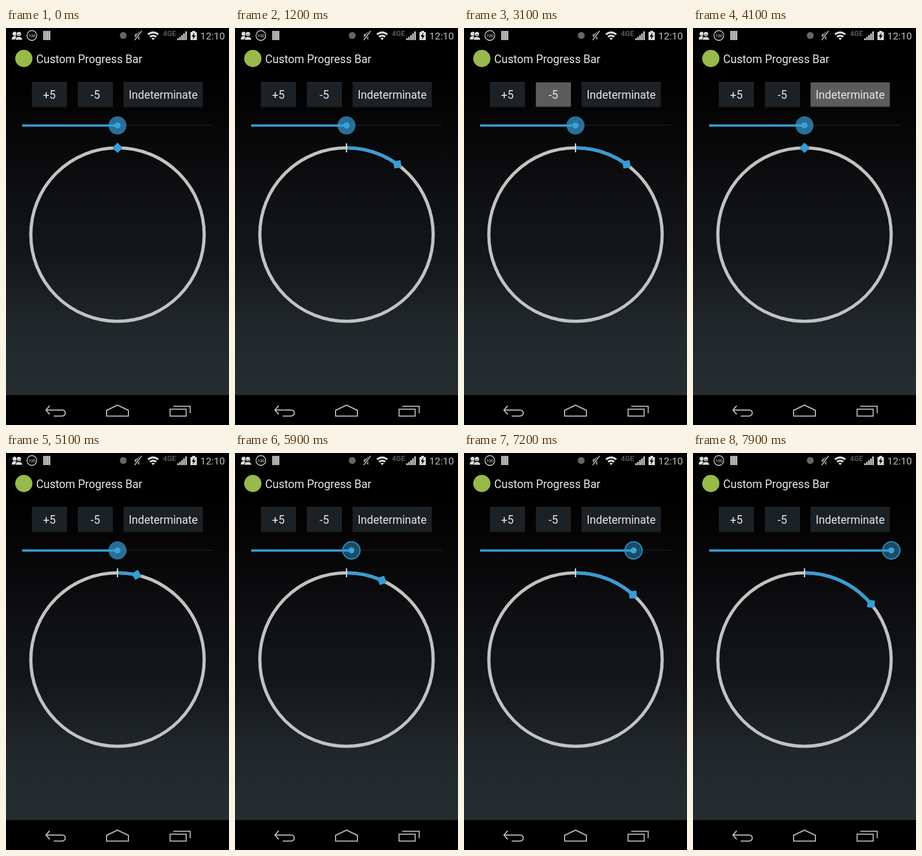
Animation of 388x690 px, one loop 8 s. Source, as an HTML page:

```html
<!DOCTYPE html>
<html lang="en">
<head>
<meta charset="utf-8">
<title>Custom Progress Bar</title>
<style>
html, body { margin: 0; width: 100%; height: 100%; overflow: hidden; background: #000; }
svg { display: block; width: 100vw; height: 100vh; }
text { font-family: Roboto, sans-serif; fill: #e6e6e6; }
.line { fill: none; stroke: #b2b2b2; stroke-width: 2; }
</style>
</head>
<body>
<svg viewBox="0 0 388 690">
  <defs>
    <linearGradient id="backdrop" x1="0" y1="0" x2="0" y2="1">
      <stop offset="0" stop-color="#000"/>
      <stop offset=".14" stop-color="#010101"/>
      <stop offset=".35" stop-color="#0a0a0c"/>
      <stop offset=".48" stop-color="#101114"/>
      <stop offset=".62" stop-color="#141619"/>
      <stop offset=".72" stop-color="#1b1f22"/>
      <stop offset=".83" stop-color="#21282b"/>
      <stop offset="1" stop-color="#262d31"/>
    </linearGradient>
  </defs>
  <rect width="388" height="690"/>
  <rect width="388" height="638" fill="url(#backdrop)"/>

  <!-- status bar -->
  <g fill="#dcdcdc">
    <circle cx="15" cy="10" r="3.6"/>
    <path d="M10 20q0-6 5-6q4 0 5 6z"/>
    <circle cx="22.500" cy="10.500" r="4.300" stroke="#000"/>
    <path d="M16 21q1-6 6.500-6t6.500 6z" stroke="#000"/>
    <path d="M20.500 11.500q2 2 4 0" fill="none" stroke="#000"/>
    <circle cx="45" cy="13" r="8.500" fill="none" stroke="#dcdcdc" stroke-width="1.300"/>
    <path d="M65 5h2.500v16H65zM68.300 5h2.500v16h-2.500zM71.500 5h2.500v16h-2.500zM74.700 5H77v16h-2.300z"/>
    <circle cx="204" cy="13" r="6" fill="#666"/>
    <path d="M224 10.500h3l5-4.500v15l-5-5h-3z" fill="#999"/>
    <path d="M236 5L224 21" fill="none" stroke="#000" stroke-width="4"/>
    <path d="M236 5L224 21" fill="none" stroke="#c8c8c8" stroke-width="1.500"/>
    <path d="M246 10q10-8 20 0l-2 2.500q-8-6-16 0zM249.500 14q6.500-4.500 13 0l-2 2.500q-4.500-3-9 0zM253 18q3-2 6 0l-3 3z"/>
    <path d="M298 18h2.500v3H298zM301.500 15.500h2.500V21h-2.500zM305 12.500h2.500V21H305zM308.500 9.500h2.500V21h-2.500zM312 6h2.500v15H312z"/>
    <path d="M324 5h5v2h3v14h-11V7h3z"/>
    <path d="M328 8l-5 7h3l-1 5 5-7h-3z" fill="#000"/>
  </g>
  <text x="45" y="15.700" font-size="7.500" text-anchor="middle">100</text>
  <text x="273" y="14" font-size="12.500" font-weight="700" style="fill:#565656">4GE</text>
  <text x="338" y="20" font-size="17.250" style="fill:#bdbdbd">12:10</text>

  <!-- action bar -->
  <circle cx="31" cy="53" r="15" fill="#98b94b"/>
  <text x="52.500" y="60.500" font-size="19.500">Custom Progress Bar</text>

  <g id="buttons"></g>

  <!-- slider -->
  <path d="M194 169H360" stroke="#1d1d1d" stroke-width="1.500"/>
  <path id="level" stroke="#359ed6" stroke-width="4"/>
  <g id="thumb">
    <circle id="halo" fill="#369dd5"/>
    <circle r="5.300" fill="#3aa3dc"/>
  </g>

  <!-- circular progress -->
  <circle cx="194" cy="359" r="150.800" fill="none" stroke="#c1c2c2" stroke-width="5.600"/>
  <path id="arc" fill="none" stroke="#369dd5" stroke-width="5.600"/>
  <path d="M194 200.500V216" stroke="#dadada" stroke-width="2.200"/>
  <rect id="marker" x="-6.400" y="-6.400" width="12.800" height="12.800" fill="#369dd5"/>

  <!-- navigation bar -->
  <g class="line">
    <path d="M76 656.500L69.500 664L76 671.500M70 664H97.500Q103 664 103 669T97.500 674.500H83"/>
    <path d="M175 674.500V664.500L194 655.500L213 664.500V674.500Z" stroke-linejoin="round"/>
    <path d="M285.500 662.500H313.500V674.500H285.500ZM291 657.500H320.500V669.500"/>
  </g>
</svg>
<script>
const LOOP = 8000, CENTER_X = 194, CENTER_Y = 359, RADIUS = 150.8;
const byId = id => document.getElementById(id);

// Each press lasts from its first to its second time; the click lands on release.
const buttons = [
  { label: '+5', x: 45, width: 61, step: 18, presses: [[500, 700], [1000, 1200], [1500, 1700]] },
  { label: '-5', x: 125, width: 61, step: -18, presses: [[2500, 2700], [3000, 3200], [3500, 3700]] },
  { label: 'Indeterminate', x: 204.5, width: 138, step: 0, presses: [[4000, 4200]] }
];
const spin = [[4200, 0], [5100, 12.7], [6600, 34.2], [7900, 50.1], [8000, 51.3]];
const drag = [[5780, 194], [6600, 252], [7900, 345], [8000, 352]];
const GRAB_TIME = 5600;

for (const button of buttons) {
  const { x, width, label } = button;
  byId('buttons').insertAdjacentHTML('beforeend', `<g>
    <rect x="${x}" y="94" width="${width}" height="43.5" rx="1"/>
    <path d="M${x} 94.500h${width}" stroke="#2b3134"/>
    <path d="M${x} 137h${width}" stroke="#14181a"/>
    <text x="${x + width / 2}" y="123" font-size="19.400" text-anchor="middle">${label}</text></g>`);
  button.face = byId('buttons').lastElementChild.querySelector('rect');
}

function along(points, t) {
  if (t <= points[0][0]) return points[0][1];
  for (let i = 1; i < points.length; i++) {
    const [t0, v0] = points[i - 1], [t1, v1] = points[i];
    if (t <= t1) return v0 + (v1 - v0) * (t - t0) / (t1 - t0);
  }
  return points[points.length - 1][1];
}

function setAttributes(id, values) {
  for (const name in values) byId(id).setAttribute(name, values[name]);
}

function drawRing(degrees) {
  const angle = degrees * Math.PI / 180;
  const x = CENTER_X + RADIUS * Math.sin(angle);
  const y = CENTER_Y - RADIUS * Math.cos(angle);
  setAttributes('arc', {
    d: `M${CENTER_X} ${CENTER_Y - RADIUS}A${RADIUS} ${RADIUS} 0 0 1 ${x} ${y}`
  });
  setAttributes('marker', { transform: `translate(${x} ${y}) rotate(${degrees + 45})` });
}

function drawSlider(x, grabbed) {
  setAttributes('level', { d: `M28 169.500H${x}` });
  setAttributes('thumb', { transform: `translate(${x} 169.300)` });
  setAttributes('halo', grabbed
    ? { r: 15, 'fill-opacity': 0.46, stroke: '#328fc0', 'stroke-width': 2 }
    : { r: 15.7, 'fill-opacity': 0.7, stroke: 'none' });
}

function render(t) {
  let degrees = along(spin, t);
  for (const { face, step, presses } of buttons) {
    const pressed = presses.some(([down, up]) => t >= down && t < up);
    face.setAttribute('fill', pressed ? '#5b5d5c' : '#1c2125');
    degrees += step * presses.filter(([, up]) => t >= up).length;
  }
  drawRing(degrees);
  drawSlider(along(drag, t), t >= GRAB_TIME);
}

const start = performance.now();
function tick() {
  render((performance.now() - start) % LOOP);
  requestAnimationFrame(tick);
}
tick();
</script>
</body>
</html>
```
